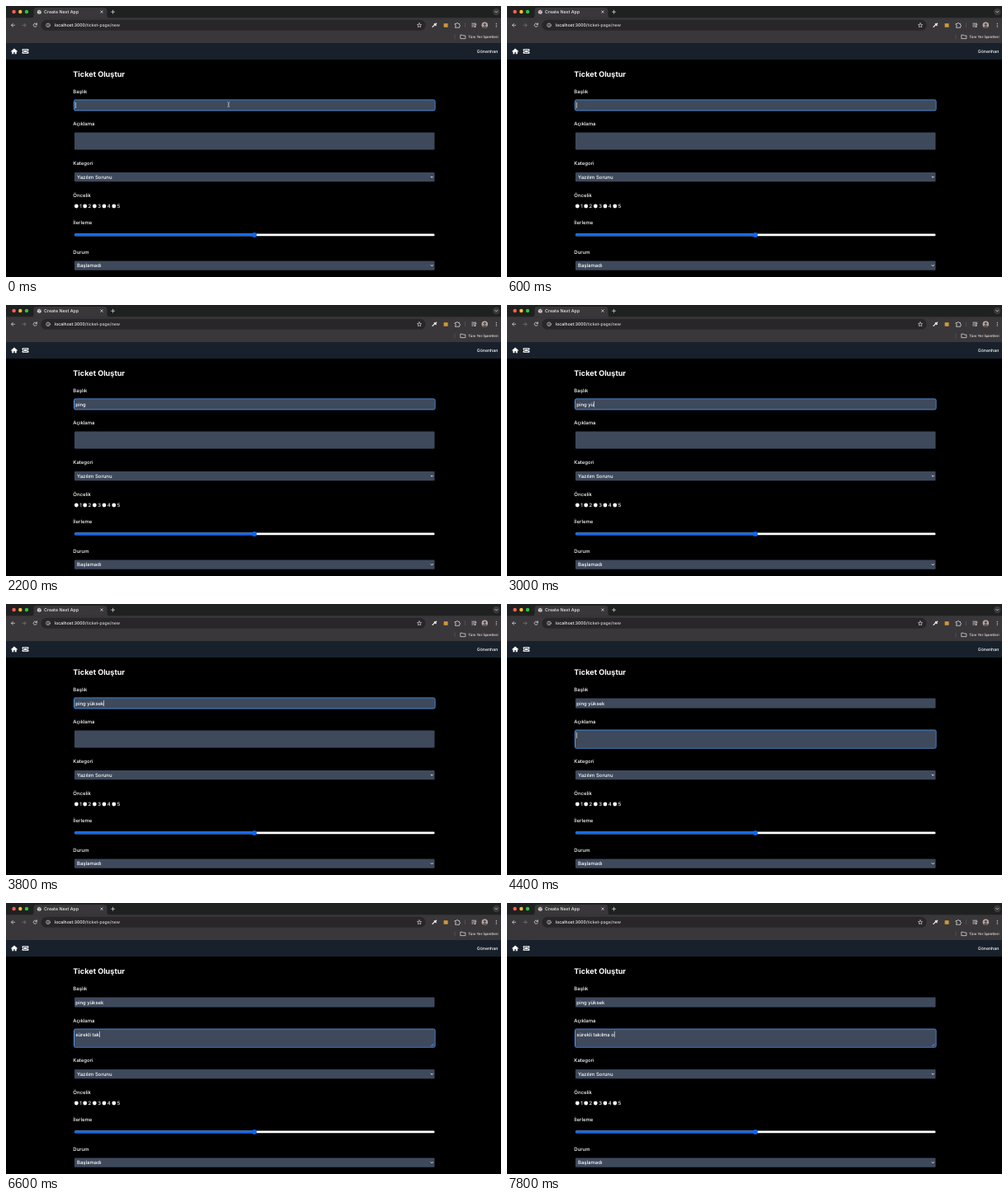
An HTML page that plays this animation: 600 by 329 pixels, repeating every 8 s.

```html
<!DOCTYPE html>
<html lang="tr">
<head>
<meta charset="utf-8">
<title>Ticket form</title>
<style>
  html, body { margin: 0; width: 100%; height: 100%; overflow: hidden; background: #000; }
  svg { display: block; width: 100vw; height: 100vh; }
  text {
    font-family: Inter, Roboto, sans-serif; font-size: 6px; font-weight: 500; fill: #fff;
    white-space: pre; text-rendering: geometricPrecision;
  }
  .title { font-size: 9.1px; font-weight: 700; }
  .typed { font-size: 5.9px; }
  .line { fill: none; stroke: #d5d3d5; stroke-width: .8; stroke-linecap: round; stroke-linejoin: round; }
  .field { fill: #3e495c; }
  .ring { fill: none; stroke: #5a9bea; stroke-width: 1; }
</style>
</head>
<body>
<svg viewBox="0 0 600 329">
  <rect width="600" height="329"/>

  <!-- browser window -->
  <rect width="600" height="15" fill="#1f2020"/>
  <rect y="14.3" width="600" height="31" fill="#393739"/>
  <path d="M30 14.5q3.5 0 3.5-3.5V5.500q0-3.500 3.500-3.500H119q3.500 0 3.500 3.500V11q0 3.500 3.500 3.500z" fill="#393739"/>
  <circle cx="9.600" cy="7" r="2.200" fill="#ff5f57"/>
  <circle cx="17.300" cy="7" r="2.200" fill="#febc2e"/>
  <circle cx="25" cy="7" r="2.200" fill="#28c840"/>
  <circle cx="40.300" cy="7.200" r="2.500" fill="#d8d8d8"/>
  <path d="M38.500 6l1.700.3.700 1.200-1.200 1.600M41.200 5l.2 1 1.100.6" class="line" style="stroke:#555;stroke-width:.7"/>
  <text x="46" y="9.100" style="font-size:5.350px;fill:#f0f0f0">Create Next App</text>
  <path class="line" d="M114.700 5.800l2.600 2.600m0-2.600l-2.600 2.600M129.600 5.200v4m-2-2h4"/>
  <circle cx="594.300" cy="7" r="4.200" fill="#3a3a3a"/>
  <path class="line" d="M592.800 6.400l1.500 1.500 1.500-1.500"/>

  <rect x="42.500" y="16.800" width="466" height="13" rx="6.500" fill="#282628"/>
  <path class="line" d="M10.500 23.300H6.500m1.900-1.900l-1.900 1.900 1.900 1.900"/>
  <path class="line" d="M20 23.300h4m-1.900-1.900l1.900 1.900-1.900 1.900" style="stroke:#79777a"/>
  <path class="line" d="M37.200 22.200a2.100 2.100 0 1 0 .1 1.800m.1-3.200v1.600h-1.600"/>
  <circle class="line" cx="51" cy="23.300" r="2.300" style="stroke-width:.7"/>
  <path class="line" d="M51 23.200v1.200M51 22.100v.01" style="stroke-width:.7"/>
  <text x="59" y="25.200" style="font-size:5.120px">localhost:3000<tspan fill="#d6d4d6">/ticket-page/new</tspan></text>
  <path id="star" class="line" style="stroke-width:.7"/>
  <path d="M517 25.400l3-3" class="line" style="stroke:#f2f2f2;stroke-width:1.300"/>
  <path d="M519.400 21.800l1.700 1.700M520.600 22.300l1-1" class="line" style="stroke:#f2f2f2;stroke-width:1.400"/>
  <rect x="530.600" y="21.200" width="5" height="4.600" fill="#d0973a"/>
  <path class="line" d="M544.500 21.500h1.500a1 1 0 0 1 2 0h1.500v1.500a1 1 0 0 1 0 2v1.300h-5v-1.300a1 1 0 0 0 0-2z"/>
  <path d="M556.500 20.800v5M544 34.800v5" class="line" style="stroke:#5b595b;stroke-width:.7"/>
  <path class="line" d="M564.800 21.200h4.600m-4.600 1.900h2.800m-2.800 1.900h1.600m2.600-2.700v2.800m0-2.800h1"/>
  <circle cx="568.400" cy="25.200" r=".9" fill="#d5d3d5"/>
  <clipPath id="face"><circle cx="580.300" cy="23.300" r="3.700"/></clipPath>
  <g clip-path="url(#face)">
    <path d="M576 19h9v9h-9z" fill="#b7aaa6"/>
    <circle cx="580.300" cy="22.300" r="1.600" fill="#5d4e4a"/>
    <ellipse cx="580.300" cy="27" rx="2.800" ry="2.700" fill="#5d4e4a"/>
  </g>
  <g fill="#d5d3d5"><circle cx="594.300" cy="21.400" r=".6"/><circle cx="594.300" cy="23.300" r=".6"/><circle cx="594.300" cy="25.200" r=".6"/></g>
  <path class="line" d="M551.200 35.200h2l.8.8h2.900v3.600h-5.700z"/>
  <text x="560.200" y="39" style="font-size:4.350px;fill:#e6e4e6">Tüm Yer İşaretleri</text>

  <!-- site header -->
  <rect y="45" width="600" height="20" fill="#18212b"/>
  <path d="M10 51.600l4 3.500-.5.600-.8-.7v3.200h-2v-2.200H9.300v2.200h-2V55l-.8.700-.5-.6z" fill="#fff"/>
  <path d="M20.300 52.200h6.400q.8 0 .8.800v1.100a.9.900 0 0 0 0 1.800V57q0 .8-.8.800h-6.400q-.8 0-.8-.8v-1.100a.9.900 0 0 0 0-1.800V53q0-.8.800-.8z" fill="#fff"/>
  <rect x="21.500" y="53.600" width="4" height="2.800" fill="none" stroke="#18212b" stroke-width=".6"/>
  <text x="596.300" y="57" text-anchor="end" style="font-size:5.200px">Gönenhan</text>

  <!-- form -->
  <text class="title" x="81.300" y="85.800">Ticket Oluştur</text>
  <g id="labels"></g>
  <rect class="field" x="83" y="114.500" width="436.500" height="12" rx="1"/>
  <rect class="field" x="83" y="153.600" width="436.500" height="21" rx="1"/>
  <rect class="field" x="83" y="202" width="436.500" height="11.200" rx="1"/>
  <rect class="field" x="83" y="309.500" width="436.500" height="11.200" rx="1"/>
  <text x="86" y="209.800">Yazılım Sorunu</text>
  <text x="86" y="317.400">Başlamadı</text>
  <path class="line" d="M515.100 207.100l1.200 1.200 1.200-1.200M515.100 314.600l1.200 1.200 1.200-1.200" style="stroke:#fff;stroke-width:.9"/>
  <g id="radios"></g>
  <rect x="83" y="276.600" width="436.500" height="2.600" rx="1.300" fill="#fff"/>
  <rect x="83" y="276.600" width="218" height="2.600" rx="1.300" fill="#0b68f5"/>
  <circle cx="301" cy="277.900" r="2.900" fill="#0b68f5"/>

  <!-- changing parts -->
  <rect id="ring" class="ring" x="82.500" width="437.500" rx="1.500"/>
  <text id="subject" class="typed" x="84.300" y="122.700"></text>
  <text id="detail" class="typed" x="84.300" y="161.700"></text>
  <rect id="caret" width=".6" height="7.300" fill="#fff"/>
  <path id="grip" class="line" d="M515.300 173.600l2.600-2.600m-.8 2.600l.8-.8" style="stroke:#5fa2ee;stroke-width:.7"/>
  <path id="beam" class="line" d="M268.600 116.700q1.200 0 1.200.9v4q0 .9-1.200.9m2.400-5.800q-1.200 0-1.200.9v4q0 .9 1.200.9" style="stroke:#c3c8d0;stroke-width:.6"/>
</svg>
<script>
const LOOP = 8000;
const $ = id => document.getElementById(id);

function add(parent, tag, attrs, content = '') {
  const el = document.createElementNS('http://www.w3.org/2000/svg', tag);
  for (const key in attrs) el.setAttribute(key, attrs[key]);
  el.textContent = content;
  parent.append(el);
  return el;
}

const labels = { 'Başlık': 106.2, 'Açıklama': 145.3, 'Kategori': 193.3, 'Öncelik': 232.2, 'İlerleme': 265.2, 'Durum': 301.2 };
for (const name in labels) add($('labels'), 'text', { x: 81.3, y: labels[name] }, name);

// Radio buttons flow inline, so each digit's width sets the next place.
let radioX = 85.3;
for (let n = 1; n <= 5; n++) {
  add($('radios'), 'circle', { cx: radioX, cy: 243, r: 2.4, fill: '#fff' });
  const digit = add($('radios'), 'text', { x: radioX + 3.9, y: 245.3 }, n);
  radioX += 7.9 + digit.getComputedTextLength();
}

$('star').setAttribute('d', 'M' + Array.from({ length: 10 }, (_, i) => {
  const a = i * Math.PI / 5, r = i % 2 ? 1.3 : 2.7;
  return (501 + r * Math.sin(a)).toFixed(2) + ' ' + (23.5 - r * Math.cos(a)).toFixed(2);
}).join('L') + 'z');

// Key presses: [time in ms, number of letters typed]
const subject = {
  el: $('subject'), value: 'ping yüksek', ringY: 114, ringH: 12.9, caretY: 116.8,
  keys: [[800, 1], [1000, 2], [1200, 3], [1400, 4], [1600, 5], [2600, 6], [3000, 7], [3200, 8], [3400, 9], [3800, 11]]
};
const detail = {
  el: $('detail'), value: 'sürekli takılma o', ringY: 153.1, ringH: 22, caretY: 155.8,
  keys: [[4800, 1], [5000, 2], [5200, 3], [5400, 4], [5600, 6], [5800, 7], [6000, 8], [6200, 9],
    [6400, 10], [6600, 11], [6800, 12], [7000, 13], [7200, 14], [7400, 15], [7800, 17]]
};
const caretOff = [[200, 600], [2000, 2400]];

const show = (id, on) => $(id).setAttribute('visibility', on ? 'visible' : 'hidden');

function type(field, t) {
  let count = 0;
  for (const [at, n] of field.keys) if (t >= at) count = n;
  const text = field.value.slice(0, count);
  if (field.el.textContent !== text) field.el.textContent = text;
}

function draw(t) {
  type(subject, t);
  type(detail, t);
  const active = t < 4400 ? subject : detail;
  $('ring').setAttribute('y', active.ringY);
  $('ring').setAttribute('height', active.ringH);
  const width = active.el.textContent ? active.el.getComputedTextLength() : 0;
  $('caret').setAttribute('x', 84.4 + width);
  $('caret').setAttribute('y', active.caretY);
  show('caret', !caretOff.some(([from, to]) => t >= from && t < to));
  show('beam', t < 600);
  show('grip', t >= 4600);
}

const start = performance.now();
function frame() {
  draw((performance.now() - start) % LOOP);
  requestAnimationFrame(frame);
}
frame();
</script>
</body>
</html>
```
